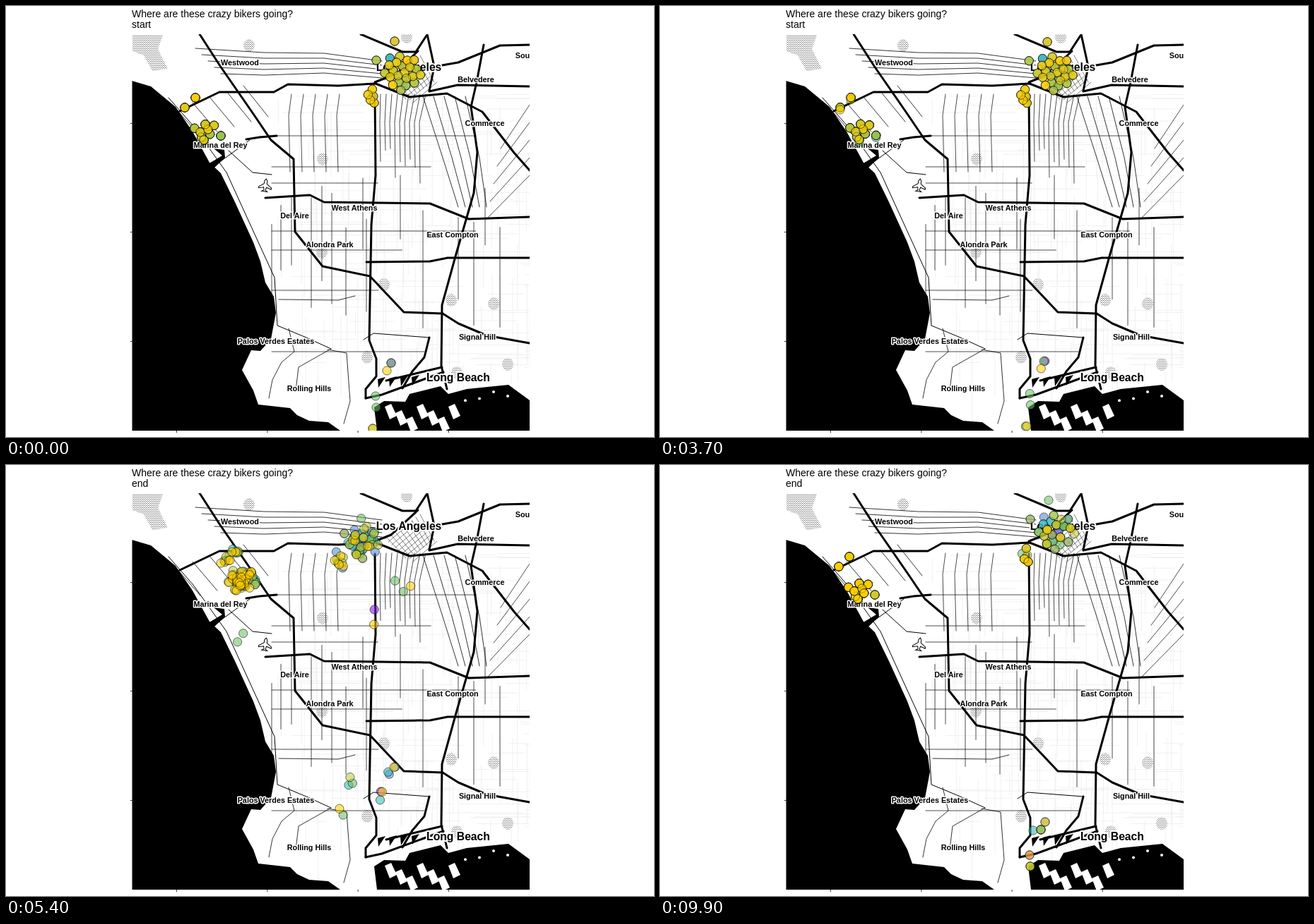
These frames come from a looping animation (917x611 px, 10000 ms). An HTML page:

```html
<!DOCTYPE html>
<html lang="en">
<head>
<meta charset="utf-8">
<title>Bike trips</title>
<style>
  html, body { margin: 0; width: 100%; height: 100%; overflow: hidden; background: #fff; }
  svg { display: block; font-family: "Liberation Sans", Arial, sans-serif; }
  #roads { fill: none; stroke: #000; stroke-linejoin: round; stroke-linecap: round; }
  #labels { font-weight: bold; font-size: 10.8px; text-anchor: middle; paint-order: stroke; stroke: #fff; stroke-width: 3px; stroke-linejoin: round; }
  #labels .big { font-size: 15.7px; stroke-width: 4px; }
  #dots { fill-opacity: .57; stroke: #000; stroke-opacity: .6; stroke-width: .9; }
</style>
</head>
<body>
<svg width="917" height="611" viewBox="0 0 917 611">
  <defs>
    <clipPath id="panel"><rect x="178.5" y="40" width="562.5" height="562"/></clipPath>
    <pattern id="hatch" width="3" height="3" patternUnits="userSpaceOnUse">
      <path d="M0 .5H1.6M1.5 2H3" stroke="#666" stroke-width=".8"/>
    </pattern>
  </defs>
  <text x="178" y="16" font-size="14">Where are these crazy bikers going?</text>
  <text id="phase" x="178" y="31" font-size="14">start</text>
  <g id="ticks" fill="#333"></g>
  <g clip-path="url(#panel)">
    <g id="parks" fill="url(#hatch)"></g>
    <g id="roads"></g>
    <g id="water"></g>
    <path transform="translate(367 254) rotate(8)" fill="#fff" stroke="#000" d="M0-9L2-6V-2L9 3V5L2 3 1 7 4 9H-4L-1 7-2 3-9 5V3L-2-2V-6Z"/>
    <g id="labels"></g>
    <g id="dots"></g>
  </g>
</svg>
<script>
const $ = id => document.getElementById(id);
const add = (id, tag, attrs) => {
  const el = document.createElementNS("http://www.w3.org/2000/svg", tag);
  for (const k in attrs) el.setAttribute(k, attrs[k]);
  return $(id).appendChild(el);
};
let seed = 11;
const random = () => (seed = (seed * 16807) % 2147483647) / 2147483647;
const between = (a, b) => a + (b - a) * random();
const pick = list => list[Math.floor(random() * list.length)];
const road = (width, points, stroke = "#000") =>
  add("roads", "polyline", { points, stroke, "stroke-width": width });
const area = (points, fill = "#000") => add("water", "polygon", { points, fill });

for (const y of [166, 320, 475]) add("ticks", "rect", { x: 176, y, width: 2.5, height: 1 });
for (let i = 0; i < 4; i++) add("ticks", "rect", { x: 241 + 128.3 * i, y: 602, width: 1, height: 3 });

add("parks", "path", { d: "M179 41H222L215 61 229 89 207 92 195 70 179 64Z" });
for (const [x, y] of [[448, 217], [344, 56], [447, 349], [535, 395], [630, 417], [690, 422], [511, 498], [710, 508], [638, 520], [567, 44]])
  add("parks", "ellipse", { cx: x, cy: y, rx: 8, ry: 9 });

// Faint residential grid
for (let i = 0; i < 220; i++) {
  const x = between(385, 741), y = between(125, 515), len = between(30, 120);
  road(.6, i % 2 ? [x, y, x + len, y] : [x, y, x, y + len], "#e8e8e8");
}
// Avenues
for (const y of [184, 228, 251, 319, 346, 403, 490]) road(.7, [376, y, between(500, 741), y]);
for (const x of [376, 389, 404, 432, 447, 461, 481, 505, 510, 558, 590, 640, 662, 678, 699]) {
  const y = between(225, 330);
  road(.7, [x, y, x, y + between(80, 170)]);
}
for (let i = 0; i < 5; i++) {
  road(.8, [268 + 9 * i, 60 + 9 * i, 365, 66 + 8 * i, 450, 67 + 7 * i, 532, 78 + 6 * i]);
  road(.7, [404 + 17 * i, 125, 400 + 17 * i, 155, 402 + 17 * i, 235]);
  road(.8, [240 + 24 * i, 145 - 8 * i, 275 + 24 * i, 185 - 7 * i]);
  road(.8, [590 + 15 * i, 128, 618 + 13 * i, 215, 640 + 10 * i, 285]);
  road(.7, [680 + 5 * i, 302 - 25 * i, 741, 240 - 25 * i]);
}
// Downtown blocks and the streets running south from them
for (let i = 0; i < 9; i++) {
  road(.5, [538 + 6 * i, 102 - 4 * i, 566 + 5 * i, 132 - 3 * i]);
  road(.5, [536 + 5 * i, 105 + 4 * i, 570 + 5 * i, 76 + 4 * i]);
  road(.7, [530 + 8 * i, 125, 529 + 7 * i, 165, 530 + 7 * i, between(200, 260)]);
}
// Coast road and hills
road(1, "230,130 265,170 312,236 348,315 380,385 384,453 425,470 460,486");
road(.8, "386,416 470,417 494,411");
road(.8, "460,486 414,512 410,545");
road(.8, "400,457 408,490 390,505 377,530 372,556");
road(.8, "455,487 482,492 487,560 478,592");
road(1, "315,205 349,236 376,239");
road(1, "293,228 345,190");
road(1, "506,473 520,464 599,470");

// Motorways
for (const line of [
  "274,40 303,85 350,153 375,190 407,217 409,320 448,369 515,383 563,434 618,436 640,450 680,467 741,478",
  "246,149 302,122 379,122 399,111 470,113 523,110 571,129 624,124 674,150 719,208 741,233",
  "522,126 523,240 517,310 514,474 524,500 524,525 509,543 509,556",
  "367,272 430,268 450,278 525,279 600,280 655,302 741,299",
  "510,363 600,362 625,357 741,357",
  "676,55 666,108 658,143 667,207 662,265 636,355 617,424 616,510 624,543",
  "502,40 561,65 580,65 595,42",
  "596,40 606,86 599,120",
  "522,108 545,99 583,64",
  "606,86 640,80 699,56 741,55",
  "599,121 639,112 741,114",
  "340,189 359,186 383,184",
  "599,470 592,498 575,518 561,542",
  "509,556 532,551 619,519",
  "538,531 617,512"
]) road(3, line);

// Ocean, marina and harbour
area("178,106 205,114 240,143 264,178 288,222 304,237 324,278 350,335 360,362 367,392 379,412 382,435 375,472 360,489 347,488 334,516 350,545 357,565 402,570 412,580 429,588 456,590 473,602 178,602");
area("286,224 306,212 294,202 309,204 310,215 294,230");
area("525,602 521,569 535,560 565,561 571,550 615,539 626,550 652,543 711,537 741,559 741,602");
for (let i = 0; i < 4; i++) {
  const x = 526 + 16 * i, y = 529 - i;
  area([x, y, x + 11, y - 3, x + 1, y + 12]);
}
for (let i = 0; i < 7; i++) {
  const x = 536 + 15 * i, y = 568 + 9 * (i % 3);
  area([x, y, x + 9, y - 4, x + 17, y + 13, x + 7, y + 18], "#fff");
}
for (let i = 0; i < 4; i++)
  add("water", "circle", { cx: 650 + 20 * i, cy: between(546, 566), r: 2, fill: "#fff" });

for (const [text, x, y, big] of [
  ["Westwood", 331, 84], ["Los Angeles", 570, 92, 1], ["Sou", 731, 74], ["Belvedere", 665, 108],
  ["Commerce", 677.5, 170], ["Marina del Rey", 303.5, 201], ["West Athens", 493, 289.5],
  ["Del Aire", 408.5, 300.5], ["East Compton", 632, 328], ["Alondra Park", 458, 341.5],
  ["Palos Verdes Estates", 382, 478.5], ["Signal Hill", 667, 472.5], ["Rolling Hills", 429, 545.5],
  ["Long Beach", 640, 532, 1]
]) add("labels", "text", { x, y, class: big ? "big" : "" }).textContent = text;

// Bike stations, spread evenly over ellipses around a few key points
const spread = (n, cx, cy, rx, ry) => Array.from({ length: n }, (_, i) => {
  const r = Math.sqrt((i + .5) / n), a = i * 2.4;
  return [cx + rx * r * Math.cos(a), cy + ry * r * Math.sin(a)];
});
const city = [[550, 50], [524, 77], ...spread(22, 560, 94, 27, 27), ...spread(5, 518, 128, 6, 14)];
const beach = [[253, 144], [268, 130], [304, 184], [280, 190], ...spread(7, 281, 175, 18, 12)];
const port = [[519, 599], [545, 506], [539, 517], [523, 553], [524, 569], [528, 518]];

// Trips leave each station in turn; a higher bias gives more yellow
const colors = ["#861cea", "#4f86cf", "#38b8bd", "#6cbf63", "#bcc93c", "#ffcf00"];
const trips = [];
function route(from, to, count, bias) {
  for (let i = 0; i < count; i++) {
    const color = Math.floor(6 * random() ** (1 / bias));
    trips.push({ start: from[i % from.length], end: pick(to), color });
  }
}
route(city, beach, 87, 2);
route(beach, city, 66, 1.6);
route(city.slice(4), port.slice(1), 7, 1.5);
route(port, city, 5, 1.5);
route(beach, port.slice(1), 5, 1.5);
route(port, beach, 2, 1.5);
trips.sort((a, b) => a.color - b.color);
for (const trip of trips) trip.dot = add("dots", "circle", { r: 6.1, fill: colors[trip.color] });

const ease = u => u < .5 ? 4 * u ** 3 : 1 - 4 * (1 - u) ** 3;
function draw() {
  const step = Math.floor(performance.now() % 10000 / 100);
  const u = Math.min(1, Math.max(0, (step - 33) / 33)), p = ease(u);
  $("phase").textContent = u < .5 ? "start" : "end";
  for (const { start, end, dot } of trips) {
    dot.setAttribute("cx", start[0] + (end[0] - start[0]) * p);
    dot.setAttribute("cy", start[1] + (end[1] - start[1]) * p);
  }
  requestAnimationFrame(draw);
}
draw();
</script>
</body>
</html>
```
